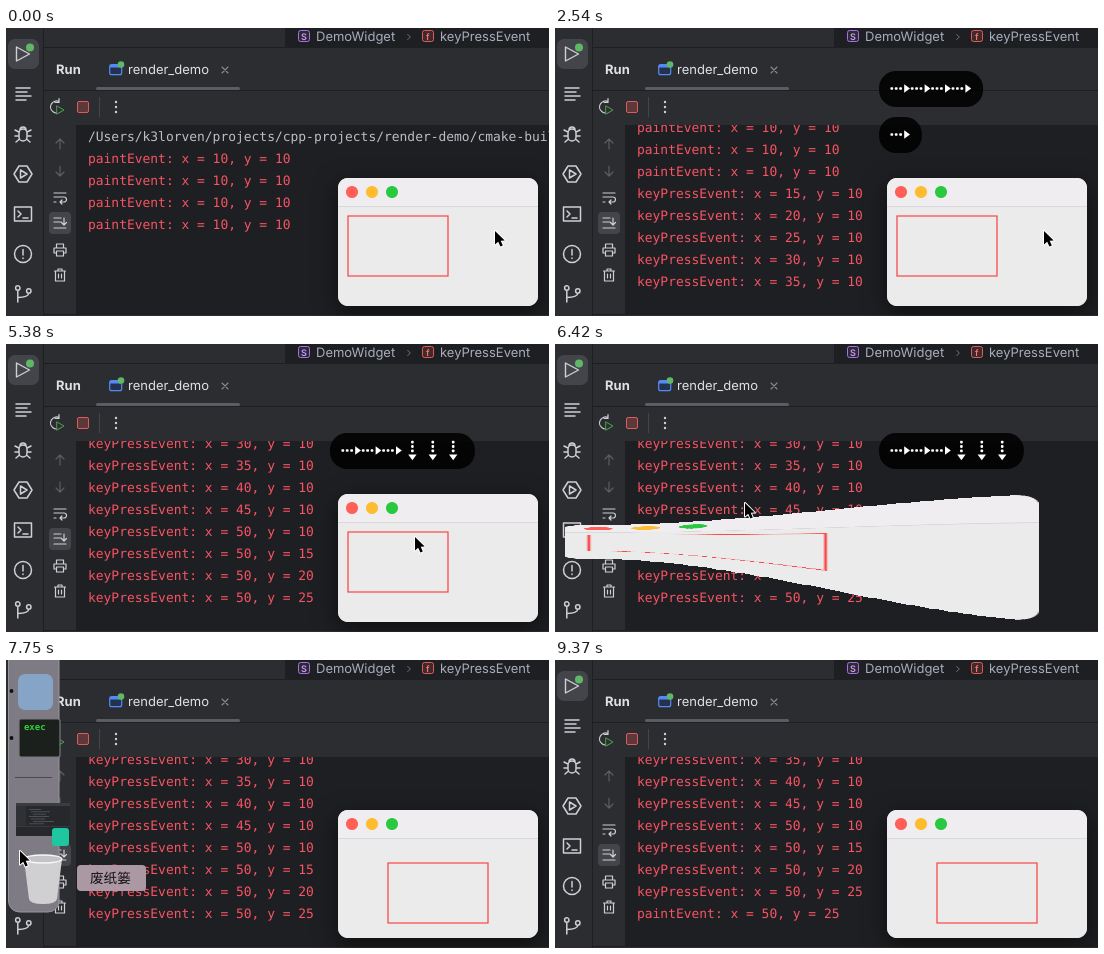
An HTML page with a canvas that plays this animation: 543 px wide and 288 px high, repeating every 9520 ms.

```html
<!DOCTYPE html>
<html lang="en">
<head>
<meta charset="utf-8">
<title>Render demo</title>
<style>
html, body { margin: 0; width: 100%; height: 100%; overflow: hidden; background: #1e1f22; }
canvas { display: block; width: 543px; height: 288px; }
</style>
</head>
<body>
<canvas id="stage"></canvas>
<script>
const W = 543, H = 288, LOOP = 9520;
const PANEL = '#2b2d30', DARK = '#1e1f22', ICON = '#ced0d6', DIM = '#5a5d63';
const UI = 'Inter, "Noto Sans", sans-serif';
const MONO = '"DejaVu Sans Mono", "Noto Sans Mono", monospace';

const dpr = window.devicePixelRatio || 1;
function makeCanvas(el, w, h, scale) {
  el.width = w * scale;
  el.height = h * scale;
  const c = el.getContext('2d');
  c.scale(scale, scale);
  return c;
}
const ctx = makeCanvas(document.getElementById('stage'), W, H, dpr);
ctx.textRendering = 'geometricPrecision';
const winCanvas = document.createElement('canvas');
const winCtx = makeCanvas(winCanvas, 200, 128, 2);

const shortTicks = [14, 30, 38, 44, 48, 52, 57, 62];
const ticks = [0];
for (let k = 0; k < 63; k++) ticks.push(ticks[k] + (shortTicks.includes(k) ? 140 : 150));
const snap = t => ticks.reduce((a, b) => (b <= t ? b : a), 0);

const clamp = v => Math.max(0, Math.min(1, v));
const lerp = (a, b, p) => a + (b - a) * p;
const smooth = p => { p = clamp(p); return p * p * (3 - 2 * p); };

// Piecewise linear track of [time, ...values].
function track(t, pts) {
  if (t <= pts[0][0]) return pts[0].slice(1);
  for (let i = 1; i < pts.length; i++) {
    const a = pts[i - 1], b = pts[i];
    if (t < b[0]) return a.slice(1).map((v, j) => lerp(v, b[j + 1], (t - a[0]) / (b[0] - a[0])));
  }
  return pts[pts.length - 1].slice(1);
}

// ---- drawing helpers ----
function box(x, y, w, h, fill, r = 0, stroke, c = ctx, lw = 1) {
  c.beginPath();
  c.roundRect(x, y, w, h, r);
  if (fill) { c.fillStyle = fill; c.fill(); }
  if (stroke) { c.strokeStyle = stroke; c.lineWidth = lw; c.stroke(); }
}
function dot(x, y, r, fill, c = ctx) {
  c.beginPath();
  c.arc(x, y, r, 0, Math.PI * 2);
  c.fillStyle = fill;
  c.fill();
}
function text(s, x, y, fill, font) {
  ctx.font = font;
  ctx.fillStyle = fill;
  ctx.fillText(s, x, y);
}
function path(d, x, y, stroke, lw = 1.4, fill, c = ctx) {
  c.save();
  c.translate(x, y);
  const p = new Path2D(d);
  c.lineCap = c.lineJoin = 'round';
  if (fill) { c.fillStyle = fill; c.fill(p); }
  if (stroke) { c.strokeStyle = stroke; c.lineWidth = lw; c.stroke(p); }
  c.restore();
}

// ---- IDE ----
const sideIcons = [
  [66, 'M-7-6H7M-7-2H4M-7 2H8M-7 6H3'],
  [106, 'M-4-1a4 4 0 0 1 8 0v4a4 4 0 0 1-8 0zM-3-4a3 3 0 0 1 6 0M-8-4l4 2M8-4l-4 2M-8 2h4M8 2h-4M-7 8l3.500-3M7 8l-3.500-3'],
  [146, 'M-4-8H4L9 0L4 8H-4L-9 0ZM-2.500-4L4 0L-2.500 4Z'],
  [186, 'M-8.500-7H8.500V7H-8.500ZM-5-3l3 3l-3 3M0 4h5'],
  [226, 'M8.500 0A8.500 8.500 0 1 1-8.500 0A8.500 8.500 0 1 1 8.500 0M0-4.500V1M0 4v.5'],
  [266, 'M-3-6a2.200 2.200 0 1 1-4.400 0a2.200 2.200 0 1 1 4.400 0M8-3a2.200 2.200 0 1 1-4.400 0a2.200 2.200 0 1 1 4.400 0M-5.200-3.800V8M5.800-.8Q5.500 3-5 3.500']
];
const gutterIcons = [
  [116, 'M0 5V-5M-4-1L0-5L4-1', DIM],
  [143, 'M0-5V5M-4 1L0 5L4 1', DIM],
  [169, 'M-6-4H6M-6 0H4a2.500 2.500 0 0 1 0 5H0M2 3l-2 2l2 2M-6 5h2', ICON],
  [195, 'M-6-5H1M-6-1H1M-6 5H6M4-5V2M1.500-.5L4 2L6.500-.5', ICON],
  [222, 'M-3.500-2V-6H3.500V-2M-3.500 3H-6V-2H6V3H3.500M-3.500 1H3.500V6H-3.500Z', ICON],
  [247, 'M-5.500-4H5.500M-2-4V-6H2V-4M-4.500-4V6H4.500V-4M-1.500-1V3M1.500-1V3', ICON]
];

function drawIde() {
  box(0, 0, W, H, PANEL);
  box(37, 0, 1, H, DARK);
  box(279, 0, W, 19, DARK);
  box(38, 19, W, 1, DARK);
  box(38, 62, W, 1, DARK);
  box(70, 97, W, 189, DARK);
  box(38, 286, W, 1, DARK);

  box(292.5, 2.500, 11, 11, '#2f2936', 2, '#a571e6');
  text('S', 295, 11.500, '#c79bf5', '600 9px ' + UI);
  text('DemoWidget', 310, 13, '#a8adbd', '13px ' + UI);
  path('M-1.300-2.600L1.300 0L-1.300 2.600', 403, 9, '#6f737a', 1);
  box(416.5, 2.500, 11, 11, '#402929', 2, '#db5c5c');
  text('f', 420, 11.500, '#f07575', '600 9px ' + UI);
  text('keyPressEvent', 434, 13, '#a8adbd', '13px ' + UI);

  box(2, 11, 31, 30, '#43454a', 7);
  path('M-5.500-7L7.500 0L-5.500 7Z', 16, 26, ICON, 1.400);
  dot(24, 19.500, 4, '#5fb865');
  for (const [y, d] of sideIcons) path(d, 17, y, ICON, 1.500);

  text('Run', 50, 46, '#dfe1e5', '700 13px ' + UI);
  box(103.700, 36.700, 12, 10, '#25324d', 2, '#548af7', ctx, 1.200);
  box(104, 37, 11, 2.500, '#548af7');
  dot(115, 36.500, 3.300, '#5fb865');
  text('render_demo', 122, 46, '#dfe1e5', '13px ' + UI);
  path('M-3-3L3 3M3-3L-3 3', 219, 42, '#868a91', 1.100);
  box(90, 59, 144, 3, DIM, 1.500);

  path('M3-5.500A6 6 0 1 0 5 4M3-8.500V-4.500H-1', 50, 79, ICON, 1.200);
  path('M0 0L7 4L0 8Z', 51, 78, '#57965c', 1, '#253627');
  box(71.500, 73.500, 11, 11, '#5e3838', 1.500, '#db5c5c');
  box(93, 69, 1, 20, '#43454a');
  for (const y of [74, 79, 84]) dot(110, y, 1.200, ICON);

  box(43, 184, 22, 22, '#43454a', 4);
  for (const [y, d, color] of gutterIcons) path(d, 54, y, color, 1.200);
}

// ---- console ----
const output = [[0, '/Users/k3lorven/projects/cpp-projects/render-demo/cmake-build-debug']];
for (let i = 0; i < 4; i++) output.push([0, 'paintEvent: x = 10, y = 10']);
[750, 900, 1500, 1800, 2540, 3140, 3440, 3890].forEach((t, i) =>
  output.push([t, `keyPressEvent: x = ${15 + 5 * i}, y = 10`]));
[4490, 4630, 4780].forEach((t, i) =>
  output.push([t, `keyPressEvent: x = 50, y = ${15 + 5 * i}`]));
output.push([8040, 'paintEvent: x = 50, y = 25']);

function drawConsole(t) {
  const n = output.filter(l => l[0] <= t).length;
  const top = Math.min(112.5, 257.5 - 22 * (n - 1));
  ctx.save();
  ctx.beginPath();
  ctx.rect(71, 97, W, 189);
  ctx.clip();
  for (let i = Math.max(0, n - 9); i < n; i++)
    text(output[i][1], 82, top + 22 * i, i ? '#f75464' : '#bcbec4', '12.95px ' + MONO);
  ctx.restore();
}

// ---- pressed keys ----
const pills = [
  { keys: [750, 900, 1200, 1500], rights: 4 },
  { keys: [2240], rights: 1 },
  { keys: [2840, 2990, 3440, 4190, 4490, 4630], rights: 3 }
];

function drawArrow(x, y, down) {
  ctx.save();
  ctx.translate(x, y);
  if (down) ctx.rotate(Math.PI / 2);
  for (let i = 0; i < 3; i++) box(-9.800 + i * 4.400, -1.300, 2.800, 2.600, '#fff', 0.800);
  path('M4-4.200L9.800 0L4 4.200Z', 0, 0, null, 0, '#fff');
  ctx.restore();
}

function drawPills(t) {
  pills.forEach((pill, i) => {
    const shown = pill.keys.filter(k => k <= t).length;
    if (!shown) return;
    const later = pills.slice(i + 1).filter(p => p.keys[0] <= t).length;
    const alpha = clamp(1 - (t - pill.keys[shown - 1] - 1850) / 450);
    if (!alpha) return;
    const y = 89 - 46 * later, step = 20.4;
    ctx.save();
    ctx.globalAlpha = alpha;
    box(324, y, 22.500 + step * shown, 36, 'rgba(0,0,0,.87)', 17);
    for (let k = 0; k < shown; k++)
      drawArrow(335 + step * (k + 0.5), y + 17.5, k >= pill.rights);
    ctx.restore();
  });
}

// ---- demo window ----
const WIN = { x: 332, y: 150, w: 200, h: 128 };

function paintWindow(moved, hover) {
  const c = winCtx;
  c.clearRect(0, 0, WIN.w, WIN.h);
  c.save();
  c.beginPath();
  c.roundRect(0, 0, WIN.w, WIN.h, 10);
  c.clip();
  box(0, 0, WIN.w, WIN.h, '#ebebeb', 0, null, c);
  box(0, 0, WIN.w, 28, '#efedf0', 0, null, c);
  box(0, 28, WIN.w, 1, '#d9d8da', 0, null, c);
  c.restore();
  const lights = [
    ['#ff5f57', 'M-2.500-2.500L2.500 2.500M2.500-2.500L-2.500 2.500'],
    ['#febc2e', 'M-3 0H3'],
    ['#28c840', 'M-3 0H3M0-3V3']
  ];
  lights.forEach(([color, mark], i) => {
    dot(14 + 20 * i, 14, 6, color, c);
    if (hover) path(mark, 14 + 20 * i, 14, 'rgba(60,20,0,.65)', 1.200, null, c);
  });
  const x = moved ? 50 : 10, y = moved ? 25 : 10;
  box(x, y + 28, 100, 60, null, 0, '#fa4b4b', c, 1.300);
}

// Columns are pulled towards the left edge, then follow into the thumbnail.
function drawGenie(p) {
  const q = smooth(p * 2);
  const left = lerp(WIN.x, 10, q);
  const right = lerp(WIN.x + WIN.w, 64, smooth(p * 2 - 1));
  const n = 100, colW = (right - left) / n;
  for (let i = 0; i < n; i++) {
    const x = left + i * colW;
    const s = smooth((x - 37) / 480);
    const top = lerp(WIN.y, lerp(181, WIN.y, s), q);
    const h = lerp(WIN.h, lerp(34, WIN.h, s), q);
    ctx.drawImage(winCanvas, i * 4, 0, 4, 256, x, top, colW + 0.4, h);
  }
}

function drawWindow(t) {
  const p = t < 7100
    ? track(t, [[6120, 0], [6270, 0.25], [6420, 0.6], [6570, 0.88], [6710, 1]])[0]
    : track(t, [[7160, 1], [7300, 0.88], [7450, 0.6], [7600, 0.25], [7750, 0]])[0];
  if (p >= 1) return;
  paintWindow(t >= 7750, t >= 5680 && t < 6270);
  if (p > 0) return drawGenie(p);
  ctx.save();
  ctx.shadowColor = 'rgba(0,0,0,.55)';
  ctx.shadowBlur = 24 * dpr;
  ctx.shadowOffsetY = 7 * dpr;
  box(WIN.x, WIN.y, WIN.w, WIN.h, '#ebebeb', 10);
  ctx.restore();
  ctx.drawImage(winCanvas, WIN.x, WIN.y, WIN.w, WIN.h);
}

// ---- dock ----
function drawExec(x, y, w, h, size) {
  box(x, y, w, h, '#1c201d', 2, '#77797b', ctx, 1.200);
  text('exec', x + w * 0.12, y + h * 0.29, '#2fd13a', `bold ${size}px ${MONO}`);
}

function drawTrash(y) {
  const g = ctx.createLinearGradient(17, 0, 57, 0);
  g.addColorStop(0, '#d0d0d3');
  g.addColorStop(0.45, '#ececee');
  g.addColorStop(1, '#b6b6ba');
  path('M-19 4L-14 44Q-13 49 0 49Q13 49 14 44L19 4Z', 37, y, null, 0, g);
  ctx.beginPath();
  ctx.ellipse(37, y + 4, 19, 4, 0, 0, Math.PI * 2);
  ctx.fillStyle = '#c4c4c8';
  ctx.fill();
  ctx.strokeStyle = '#f7f7f8';
  ctx.lineWidth = 1.3;
  ctx.stroke();
}

function drawIdeThumb(y) {
  box(10, y, 54, 33, '#26282b');
  box(10, y, 54, 3, '#3a3c40');
  box(10, y + 3, 10, 20, '#2f3135');
  for (let i = 0; i < 7; i++)
    box(23 + (i % 3) * 2, y + 6 + i * 2.4, 12 + (i * 7) % 13, 0.800, '#54585e');
  box(10, y + 23, 54, 0.800, '#3c3f43');
  box(46, y + 25, 17, 18, '#1fc7a0', 3);
}

function drawWinThumb(y) {
  box(10, y, 54, 34, '#ebebeb', 2);
  ['#ff5f57', '#febc2e', '#28c840'].forEach((c, i) => dot(14 + i * 5.400, y + 4, 1.600, c));
  box(10, y + 8, 54, 0.600, '#d0d0d0');
  box(13, y + 10.500, 27, 16, null, 0, '#f47a7a', ctx, 0.800);
  drawExec(45.500, y + 24, 18, 17, 5);
}

function drawLabel(s, y, w) {
  box(71, y, w, 26, '#ac98a3', 4);
  text(s, 84, y + 18, '#151215', '13.6px Inter, "Noto Sans CJK SC", "Noto Sans CJK", sans-serif');
}

function drawDock(t) {
  // Slides in after the pointer reaches the edge, out after it has left.
  const [dx] = track(t, [[6570, -70], [6710, -36], [6860, 0], [8040, 0], [8190, -20], [8340, -54], [8490, -70]]);
  if (dx <= -70) return;
  const r = smooth((t - 7160) / 590);
  const down = 20 * r;
  ctx.save();
  ctx.translate(dx, 0);
  box(2.500, -30, 50.500, 316 - 34 * r, '#7f7b84', 11, '#99959e');
  box(12, -6 + down, 35, 36, '#86a5c6', 7);
  drawExec(13, 38 + down + r, 41, 38, 9);
  dot(5.500, 11 + down, 1.900, '#0d0d0f');
  dot(5.500, 58 + down, 1.900, '#0d0d0f');
  box(9, 97 + down, 37, 1, '#4b484e');
  drawIdeThumb(122 + down + r);
  if (t < 7300) drawWinThumb(181);
  drawTrash(232 - 37 * r);
  ctx.restore();
  if (t >= 6860 && t < 7300) drawLabel('capi – canvas_widget.cpp', 125, 193);
  if (t >= 7600 && t < 8040) drawLabel('废纸篓', 205, 69);
}

// ---- pointer ----
const ARROW = 'M0 0V13.500L3.200 10.700L5.400 15.600L7.800 14.500L5.700 9.800L9.700 9.600Z';
const route = [
  [5230, 489, 202], [5380, 409, 192], [5530, 384, 177], [5680, 371, 167], [5970, 366, 163],
  [6270, 366, 163], [6420, 190, 158], [6570, 14, 152], [6710, -3, 152], [6860, -5, 160],
  [7010, -5, 172], [7160, 5, 184], [7300, 14, 190], [7750, 14, 190], [7890, 24, 191],
  [8040, 95, 195], [8190, 225, 199], [8340, 330, 199], [8490, 392, 199], [8630, 428, 205],
  [8780, 457, 219], [8930, 479, 239], [9080, 490, 259], [9230, 495, 277], [9370, 496, 300]
];

function drawPointer(t) {
  const [x, y] = track(t, route);
  path(ARROW, x, y + 1, '#fff', 2);
  path(ARROW, x, y + 1, null, 0, '#000');
}

function render(now) {
  const t = snap(now % LOOP);
  drawIde();
  drawConsole(t);
  drawWindow(t);
  drawPills(t);
  drawDock(t);
  drawPointer(t);
}

const start = performance.now();
function loop() {
  render(performance.now() - start);
  requestAnimationFrame(loop);
}
loop();
</script>
</body>
</html>
```
